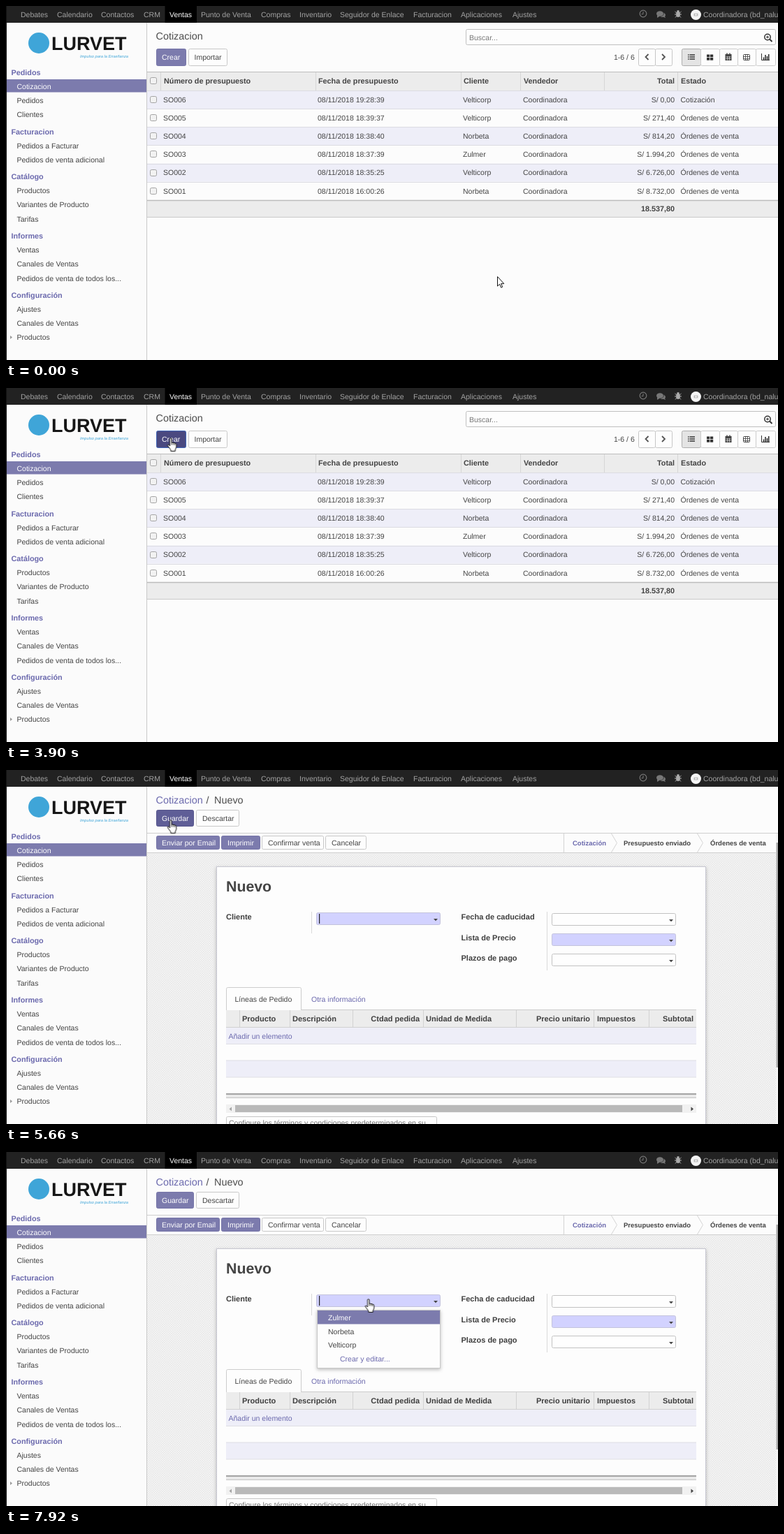
Write an HTML page that moves like this. It is 1105x507 px and loops after 8000 ms.

```html
<!DOCTYPE html>
<html lang="es">
<head>
<meta charset="utf-8">
<title>Cotizaciones</title>
<style>
html, body { margin: 0; width: 100%; height: 100%; overflow: hidden; background: #fcfcfc; }
svg { display: block; width: 1105px; height: 507px; }
text { font: 10.5px "Liberation Sans", Arial, sans-serif; fill: #444; text-rendering: geometricPrecision; white-space: pre; }
.b { font-weight: bold; font-size: 10.8px; }
.form { font-weight: bold; font-size: 11px; fill: #3f3f3f; }
.state { font-weight: bold; font-size: 9.5px; }
.crumb { font-size: 14.4px; fill: #4c4c4c; }
.title { font-weight: bold; font-size: 21.3px; fill: #454545; }
.brand { font-weight: bold; font-size: 27px; fill: #161616; }
.motto { font-size: 5.7px; font-style: italic; fill: #3fa5d8; }
.end { text-anchor: end; }
.w { fill: #fff; }
.p { fill: #6b69ad; }
.m { fill: #a3a3a3; }
.g { fill: #777; }
.anim { animation: 8s step-end infinite; }
</style>
</head>
<body>
<svg id="stage" viewBox="0 0 1105 507" xmlns="http://www.w3.org/2000/svg"></svg>
<script>
const PURPLE = '#7c7bad', HOVER = '#5f5e97', PRESSED = '#4a4980', BAND = '#eeeef8', HEAD = '#ececec';

// y is the vertical middle of the line of text
const text = (x, y, s, cls = '', shift = 3.8) => `<text x="${x}" y="${y + shift}" class="${cls}">${s}</text>`;
const rect = (x, y, w, h, fill, more = '') => `<rect x="${x}" y="${y}" width="${w}" height="${h}" fill="${fill}" ${more}/>`;
const box = (x, y, w, h, fill = '#fdfdfd', stroke = '#c6c6c6', r = 2) =>
  rect(x + .5, y + .5, w - 1, h - 1, fill, `stroke="${stroke}" rx="${r}"`);
const line = (d, stroke = '#ccc', w = 1) => `<path d="${d}" fill="none" stroke="${stroke}" stroke-width="${w}"/>`;
const shape = (d, fill, more = '') => `<path d="${d}" fill="${fill}" ${more}/>`;
const group = (name, body) => `<g class="anim" style="animation-name:${name}">${body}</g>`;
const button = (x, y, w, h, label, tx, primary) =>
  box(x, y, w, h, primary ? PURPLE : '#fdfdfd', primary ? '#7675a8' : '#c8c8c8') +
  text(tx, y + h / 2, label, primary ? 'w' : '');
const liveButton = (name, x, y, w, h, label, tx) =>
  `<rect class="anim" style="animation-name:${name}" x="${x + .5}" y="${y + .5}" width="${w - 1}" height="${h - 1}" rx="2"/>` +
  text(tx, y + h / 2, label, 'w');

function topBar() {
  const menu = [['Debates', 21], ['Calendario', 73], ['Contactos', 136], ['CRM', 197], ['Ventas', 234],
    ['Punto de Venta', 279], ['Compras', 365], ['Inventario', 420], ['Seguidor de Enlace', 478],
    ['Facturacion', 583], ['Aplicaciones', 651], ['Ajustes', 725]];
  return rect(0, 0, 1105, 24, '#222') + rect(227.5, 0, 45.5, 24, '#000') +
    menu.map(([s, x]) => text(x, 12, s, s === 'Ventas' ? 'w' : 'm')).join('') +
    `<circle cx="912" cy="11" r="4.8" fill="none" stroke="#777" stroke-width="1.2"/>` + line('M912 8V11.6H909.5', '#777') +
    `<ellipse cx="936" cy="11" rx="5" ry="3.8" fill="#777"/>` + shape('M932 13L932 17L936 14.5Z', '#777') +
    shape('M941.6 9.5q4 3 1.4 5.5l1 2-3.2-1.2q-2.6.3-4-.6 5.4-.8 4.8-5.7z', '#777') +
    line('M957.5 8L960 10M966.5 8L964 10M957 12H967M958 16.5L960 14M966 16.5L964 14', '#aaa') +
    `<ellipse cx="962" cy="12" rx="2.9" ry="4" fill="#aaa"/><circle cx="962" cy="8" r="1.9" fill="#aaa"/>` +
    `<circle cx="987.5" cy="12.5" r="7.5" fill="#f4f4f4"/>` + rect(984.5, 10.5, 6, 4, '#bbb', 'rx="1"') +
    `<circle cx="987.5" cy="12.5" r="1.2" fill="#f4f4f4"/>` +
    text(998, 12, 'Coordinadora (bd_nalu', 'm');
}

function sideBar() {
  const menu = [
    ['Pedidos', 95, 1], ['Cotizacion', 115], ['Pedidos', 135], ['Clientes', 155.5],
    ['Facturacion', 180, 1], ['Pedidos a Facturar', 200], ['Pedidos de venta adicional', 220],
    ['Catálogo', 244, 1], ['Productos', 264], ['Variantes de Producto', 284.5], ['Tarifas', 305],
    ['Informes', 329, 1], ['Ventas', 349], ['Canales de Ventas', 369.5], ['Pedidos de venta de todos los...', 390],
    ['Configuración', 414, 1], ['Ajustes', 434], ['Canales de Ventas', 454], ['Productos', 474.5]];
  return rect(0, 24, 201, 483, '#fbfbfb') + line('M201.5 24V507', '#c9c9c9') +
    `<circle cx="47" cy="53" r="15" fill="#3fa5d8"/>` +
    text(65, 53, 'LURVET', 'brand', 10) + text(106, 71.5, 'Impulso para la Enseñanza', 'motto', 2) +
    rect(0, 105, 201, 18.5, PURPLE) +
    menu.map(([s, y, head]) => text(head ? 7.5 : 15.5, y, s, head ? 'b p' : y === 115 ? 'w' : '')).join('') +
    shape('M6 472L9 474.5L6 477Z', '#999') + rect(0, 0, 1, 507, '#111');
}

const checkbox = y => box(206, y - 5, 10, 10, '#f2f2f2', '#a3a3a3');

function viewButtons() {
  const xs = [967, 994, 1021, 1047, 1073, 1101];
  let s = '';
  for (let i = 0; i < 5; i++) s += box(xs[i], 61, xs[i + 1] - xs[i] + 1, 25, i ? '#fdfdfd' : '#e4e4e4', i ? '#ccc' : '#adadad');
  for (const y of [70, 73, 76]) s += line(`M976 ${y}h1.5M978.5 ${y}h7.5`, '#333', 1.6);
  for (const x of [1003, 1008]) for (const y of [69.5, 74]) s += rect(x, y, 4.2, 3.7, '#333');
  s += rect(1029.5, 69, 9, 9, '#444') + line('M1030.5 73H1037.5M1030.5 75.5H1037.5M1032.5 72V77.5M1035.5 72V77.5', '#ddd', .7) +
    line('M1032 67.5V70M1036 67.5V70', '#444', 1.5);
  s += box(1055, 69, 10, 9, '#fff', '#444', 1) + line('M1055 72.5H1065M1055 75.5H1065M1058.5 69V78M1061.5 69V78', '#444', .8);
  return s + line('M1081.5 68V77.5H1093', '#333') + line('M1084.5 77V73.5M1087 77V70M1089.5 77V72M1091.7 77V69', '#333', 1.6);
}

function listView() {
  const rows = [
    ['19:28:39', 'Velticorp', '0,00'], ['18:39:37', 'Velticorp', '271,40'], ['18:38:40', 'Norbeta', '814,20'],
    ['18:37:39', 'Zulmer', '1.994,20'], ['18:35:25', 'Velticorp', '6.726,00'], ['16:00:26', 'Norbeta', '8.732,00']];
  const body = rows.map(([time, client, total], i) => {
    const top = 121 + i * 26.15, y = top + 13;
    return rect(202, top, 903, 26.15, i % 2 ? '#fcfcfc' : BAND) + line(`M202 ${Math.round(top) + .5}H1105`, '#dcdce2') +
      checkbox(Math.round(y)) + text(225, y, 'SO00' + (6 - i)) + text(446, y, '08/11/2018 ' + time) +
      text(654, y, client) + text(740, y, 'Coordinadora') + text(957, y, 'S/ ' + total, 'end') +
      text(965.5, y, i ? 'Órdenes de venta' : 'Cotización');
  }).join('');
  const heads = [['Número de presupuesto', 226], ['Fecha de presupuesto', 447], ['Cliente', 655], ['Vendedor', 741], ['Estado', 966]];
  return rect(202, 24, 903, 483, '#fcfcfc') + text(214.5, 43, 'Cotizacion', 'crumb', 5) +
    liveButton('create', 215, 61, 43, 25, 'Crear', 223) + button(261, 61, 56, 25, 'Importar', 269.5) +
    box(658, 33, 444, 23, '#fdfdfd', '#c0c0c0') + text(663, 45, 'Buscar...', 'g') +
    `<circle cx="1090" cy="44.5" r="4.2" fill="none" stroke="#333" stroke-width="1.5"/>` +
    line('M1093 47.5L1096.5 51', '#333', 2) + line('M1088 44.5H1092M1090 42.5V46.5', '#333') +
    text(870, 73.5, '1-6 / 6') + box(905, 61, 25, 25) + box(929, 61, 25, 25) +
    line('M919.5 69L915.5 73L919.5 77M939 69L943 73L939 77', '#555', 1.8) + viewButtons() +
    rect(202, 94, 903, 27, HEAD) + line('M202 94.5H1105', '#bdbdbd') +
    line('M221.5 95V121M443.5 95V121M651.5 95V121M736.5 95V121M856.5 95V121M961.5 95V121', '#d6d6d6') +
    checkbox(107) + heads.map(([s, x]) => text(x, 107, s, 'b')).join('') + text(957, 107, 'Total', 'b end') +
    body + rect(202, 278, 903, 25, HEAD) + line('M202 278.5H1105', '#bcbcbc', 1.6) + line('M202 302.5H1105', '#c9c9c9') +
    text(957, 290.5, '18.537,80', 'b end');
}

const field = (x, y, needed) => box(x, y, 178, 18, needed ? '#d2d2ff' : '#fefefe', needed ? '#c3c3dc' : '#c2c2c2') +
  shape(`M${x + 168} ${y + 9}h6l-3 3.2z`, '#444');

function orderLines() {
  const cols = [['Producto', 338], ['Descripción', 410], ['Ctdad pedida', 592, 1], ['Unidad de Medida', 601],
    ['Precio unitario', 836, 1], ['Impuestos', 846], ['Subtotal', 984, 1]];
  return line('M315 343.5H988') +
    shape('M315.5 344V313.5q0-2 2-2H420.5q2 0 2 2V344Z', '#fdfdfd', 'stroke="#ccc"') + rect(316, 343, 106, 1, '#fdfdfd') +
    text(327.5, 328, 'Líneas de Pedido') + text(437, 328, 'Otra información', 'p') +
    rect(315, 344, 673, 24, HEAD) + line('M315 368.5H988', '#d0d0d0') +
    [334, 406, 496, 597, 730, 841, 920].map(x => line(`M${x}.5 344V368`, '#d2d2d2')).join('') +
    cols.map(([s, x, end]) => text(x, 356, s, 'form' + (end ? ' end' : ''))).join('') +
    rect(315, 369, 673, 23, BAND) + rect(315, 416, 673, 24, BAND) +
    line('M315 392.5H988M315 416H988M315 440H988', '#dedee4') + text(318.5, 381, 'Añadir un elemento', 'p') +
    rect(315, 464, 673, 5, '#e9e9e9') + line('M315 464H988', '#8a8a8a', 1.6) + line('M315 469.5H988', '#c4c4c4') +
    rect(315, 479, 673, 12, '#f1f1f1') + rect(328, 480, 640, 10, '#b9b9b9') +
    shape('M323 482.5V488.5L319.5 485.5Z', '#a5a5a5') + shape('M980.5 482.5V488.5L984 485.5Z', '#444') +
    box(315, 496, 302, 30) + text(319, 505.5, 'Configure los términos y condiciones predeterminados en su...', 'g');
}

function dropdown() {
  return rect(445.5, 226.5, 176, 83, '#fdfdfd', 'stroke="#c8c8c8" filter="url(#soft)"') + rect(446, 227, 175, 19.5, PURPLE) +
    text(461, 237, 'Zulmer', 'w') + text(461, 257, 'Norbeta') + text(461, 276, 'Velticorp') + text(478, 296, 'Crear y editar...', 'p');
}

function formView() {
  return rect(202, 24, 903, 94, '#fcfcfc') + rect(202, 118, 903, 389, 'url(#weave)') +
    text(214.5, 43, 'Cotizacion', 'crumb p', 5) + text(286.5, 43, '/', 'crumb', 5) + text(298, 43, 'Nuevo', 'crumb', 5) +
    liveButton('save', 215, 57, 54, 24, 'Guardar', 223) + button(272, 57, 62, 24, 'Descartar', 281) +
    line('M202 90.5H1105M202 118.5H1105', '#cfcfcf') +
    button(215, 94, 91, 20, 'Enviar por Email', 223, 1) + button(308, 94, 56, 20, 'Imprimir', 317, 1) +
    button(366, 94, 89, 20, 'Confirmar venta', 375) + button(457, 94, 59, 20, 'Cancelar', 466) +
    line('M798.5 91V118M866.5 91L874.5 104.5L866.5 118M989.5 91L997.5 104.5L989.5 118', '#d4d4d4') +
    text(811, 104.5, 'Cotización', 'state p', 3.5) + text(884, 104.5, 'Presupuesto enviado', 'state', 3.5) +
    text(1008, 104.5, 'Órdenes de venta', 'state', 3.5) +
    rect(301.5, 138.5, 700, 400, '#fdfdfd', 'stroke="#c8c8d2" filter="url(#soft)"') +
    rect(1102, 91, 3, 416, '#f4f4f4') + rect(1102.5, 104, 2.5, 322, '#a9a9a9') +
    text(315, 167, 'Nuevo', 'title', 7.3) + text(315, 210.5, 'Cliente', 'form') +
    line('M437.5 203V234M774.5 203V287', '#d9d9d9') + field(444, 204, 1) +
    group('caret', rect(448, 206, 1.2, 14, '#222')) +
    text(651.5, 210.5, 'Fecha de caducidad', 'form') + text(651.5, 240, 'Lista de Precio', 'form') +
    text(651.5, 269, 'Plazos de pago', 'form') + field(781, 205) + field(781, 234, 1) + field(781, 263) +
    orderLines() + group('menu', dropdown());
}

function loader() {
  return shape('M478 0H558V16q0 3.5-3.5 3.5H481.5q-3.5 0-3.5-3.5Z', '#875a80') +
    group('one', text(487.5, 9.5, 'Cargando (1)', 'w')) + group('two', text(487.5, 9.5, 'Cargando (2)', 'w'));
}

function pointer() {
  const draw = d => shape(d, '#fff', 'stroke="#111" stroke-linejoin="round"');
  return group('arrow', draw('M.5 .6V14.2L3.6 11.4L5.7 16.3L7.7 15.4L5.6 10.7H9.8Z')) +
    group('hand', draw('M4 12V2a1.3 1.3 0 0 1 2.6 0V7.2q1.2-.8 2.3.4 1.2-.7 2.2.5 2.2-.3 2.2 1.8V13q0 2-1.5 4v2.4H5.3V17.5L1.2 12q-1-1.6.2-2 1-.3 2.6 2z') +
      line('M6.6 7V10.5M8.9 7.5V10.7M11.1 8.1V11', '#111', .8));
}

document.getElementById('stage').innerHTML = `<defs>
  <pattern id="weave" width="3.28" height="3.28" patternUnits="userSpaceOnUse">
    <rect width="3.28" height="3.28" fill="#f6f6f6"/><path d="M0 0h1.64v1.64H0zM1.64 1.64h1.64v1.64H1.64z" fill="#e7e7e7"/>
  </pattern>
  <filter id="soft" x="-10%" y="-10%" width="120%" height="130%"><feDropShadow dx="0" dy="2" stdDeviation="2.5" flood-opacity=".25"/></filter>
</defs>` + topBar() + sideBar() + group('list', listView()) + group('sheet', formView()) +
  group('loader', loader()) + group('pointer', pointer());

// Each track lists [ms, value] pairs; every value holds until the next one.
const LOOP = 8000;
function track(name, keys, css) {
  const last = keys[keys.length - 1][1];
  const stops = keys.map(([ms, v]) => `${ms / LOOP * 100}% {${css(v)}}`).join(' ');
  return `@keyframes ${name} {${stops} 100% {${css(last)}}}`;
}
const show = v => `visibility:${v ? 'visible' : 'hidden'}`;
const fade = v => `opacity:${v}`;
const paint = ([fill, stroke]) => `fill:${fill};stroke:${stroke}`;
const move = ([x, y]) => `transform:translate(${x}px,${y}px)`;

const tracks = [
  track('list', [[0, 1], [5660, 0]], fade),
  track('sheet', [[0, 0], [5660, 1]], fade),
  track('create', [[0, [PURPLE, '#7675a8']], [2820, [HOVER, '#56558c']], [3900, [PRESSED, '#3f66b8']], [4040, [HOVER, '#3f66b8']]], paint),
  track('save', [[0, [HOVER, '#56558c']], [6250, [PURPLE, '#7675a8']]], paint),
  track('caret', [[0, 1], [6250, 0], [6760, 1], [7180, 0], [7770, 1]], fade),
  track('menu', [[0, 0], [7470, 1]], fade),
  track('loader', [[0, 0], [4040, 1], [4440, .7], [4570, .25], [4710, 1], [5100, .7], [5230, .3], [5380, 0],
    [7180, 1], [7610, .45], [7770, 0]], fade),
  track('one', [[0, 1], [4710, 0], [5660, 1]], show),
  track('two', [[0, 0], [4710, 1], [5660, 0]], show),
  track('arrow', [[0, 1], [1980, 0], [6250, 1], [6910, 0]], show),
  track('hand', [[0, 0], [1980, 1], [6250, 0], [6910, 1]], show),
  track('pointer', [[0, [703, 387]], [1150, [701, 386]], [1280, [696, 385]], [1420, [686, 383]], [1550, [667, 381]],
    [1700, [598, 369]], [1830, [507, 351]], [1980, [346, 271]], [2130, [314.5, 236.5]], [2260, [304, 227]],
    [2410, [284, 185]], [2540, [264, 138]], [2690, [247, 100]], [2820, [236, 81]], [2960, [232, 75]], [3110, [230.5, 71]],
    [6250, [268, 88]], [6380, [355, 132]], [6500, [426, 168]], [6640, [465, 184]], [6760, [492, 197]],
    [6910, [508, 206]], [7040, [513.5, 210]]], move)
];
const sheet = document.createElement('style');
sheet.textContent = tracks.join('\n');
document.head.append(sheet);
</script>
</body>
</html>
```
